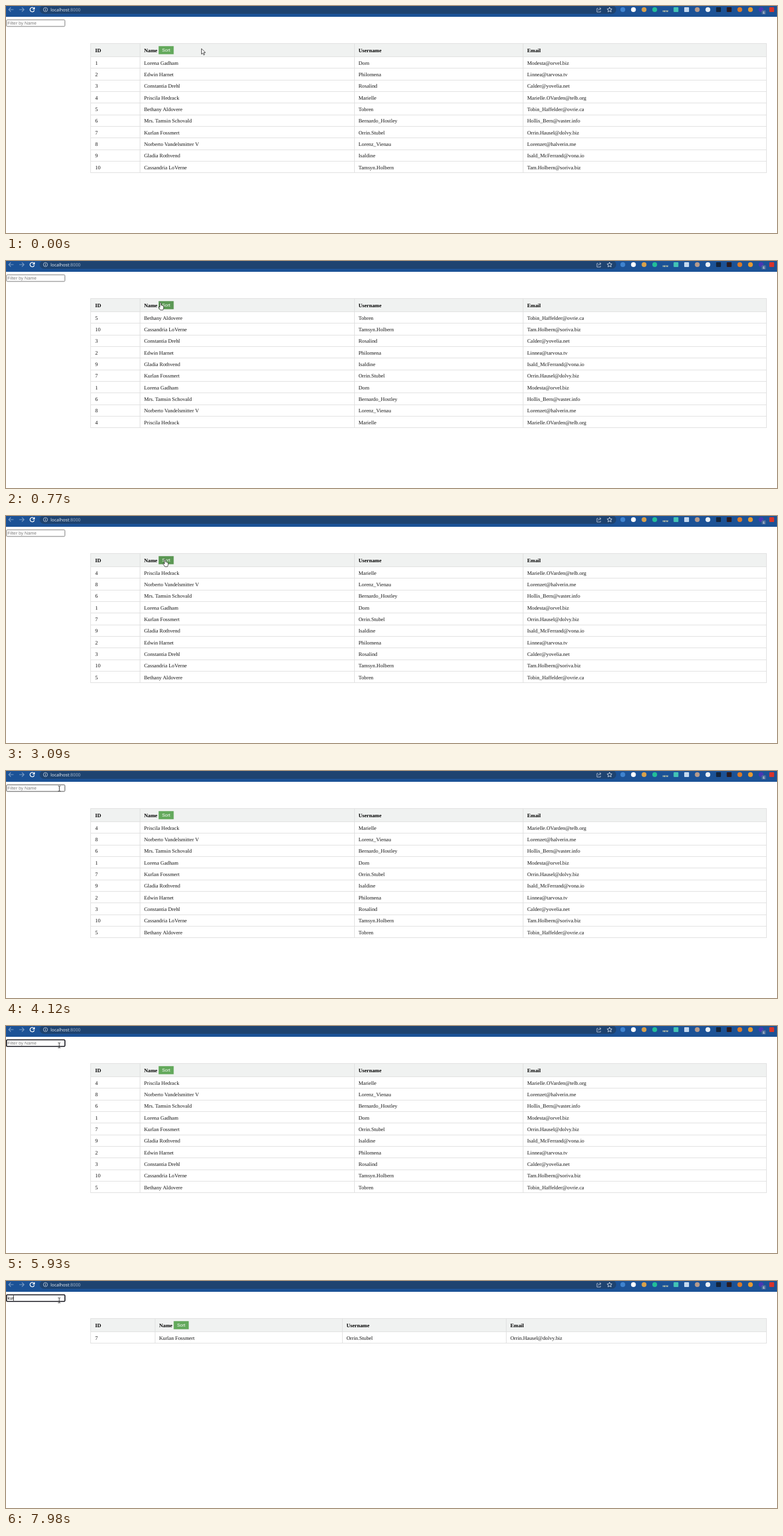
Animation of 1280 by 378 pixels, one loop 8 s. Source, as an HTML page:

```html
<!DOCTYPE html>
<html lang="en">
<head>
<meta charset="utf-8">
<title>Filter and sort table</title>
<style>
  html, body { margin: 0; width: 100%; height: 100%; overflow: hidden; background: #fff; }
  svg { display: block; width: 1280px; height: 378px; }
  text { font: 8.8px "Liberation Serif", serif; fill: #161616; text-rendering: geometricPrecision; white-space: pre; }
  .bold { font-weight: bold; fill: #000; }
  .ui { font: 7.4px "Liberation Sans", sans-serif; }
  .url { font: 7.4px "Open Sans", sans-serif; fill: #f2f5f9; }
  .line { fill: #e0e0e0; }
</style>
</head>
<body>
<svg viewBox="0 0 1280 378">
  <g id="bar">
    <rect width="1280" height="18" fill="#1c5296"/>
    <rect x="56" y="-1" width="957" height="14" rx="7" fill="#1e4370"/>
    <g fill="none" stroke-width="1.1">
      <path d="M12.5 6h-8M8 2.5L4.5 6L8 9.500" stroke="#7d9dc6"/>
      <path d="M22 6h8M26.500 2.500L30 6L26.500 9.500" stroke="#7d9dc6"/>
      <path d="M46.300 3.700A3.600 3.600 0 1 0 47 7M47.300 2v3h-3" stroke="#fff" stroke-width="1.300"/>
      <circle cx="65.500" cy="6" r="3.400" stroke="#d5deea" stroke-width=".8"/>
      <path d="M65.500 5.500v2.400M65.500 3.800v.9" stroke="#d5deea" stroke-width=".9"/>
      <path d="M983 4h-2v6h6v-2M983 7.500q.5-3 4-3M985.500 2.500l2.500 2l-2.500 2" stroke="#b9c6d8" stroke-width=".9"/>
      <path d="M1002 2l1.200 2.700l2.900.3l-2.200 1.900l.7 2.900l-2.600-1.500l-2.600 1.500l.7-2.900l-2.200-1.900l2.900-.3z" stroke="#dbe3ee" stroke-width=".9"/>
    </g>
    <text class="url" x="74" y="8.700">localhost<tspan fill="#a9b9cd">:8000</tspan></text>
  </g>
  <g id="field"></g>
  <g id="table"></g>
  <g id="pointer"></g>
</svg>
<script>
const LOOP = 8000;
const $ = id => document.getElementById(id);
const rect = (x, y, w, h, rest) => `<rect x="${x}" y="${y}" width="${w}" height="${h}" ${rest}/>`;
const dot = (x, y, r, fill, rest = '') => `<circle cx="${x}" cy="${y}" r="${r}" fill="${fill}" ${rest}/>`;
const text = (x, y, s, cls = '', rest = '') => `<text x="${x}" y="${y}" class="${cls}" ${rest}>${s}</text>`;

const people = [
  ['Lorena Gadham', 'Dorn', 'Modesta@orvel.biz'],
  ['Edwin Harnet', 'Philomena', 'Linnea@tarvosa.tv'],
  ['Constantia Drehl', 'Rosalind', 'Calder@yovelia.net'],
  ['Priscila Hedrack', 'Marielle', 'Marielle.OVarden@telb.org'],
  ['Bethany Aldovere', 'Tobren', 'Tobin_Haffelder@ovrie.ca'],
  ['Mrs. Tamsin Schovald', 'Bernardo_Hostley', 'Hollis_Bern@vaster.info'],
  ['Kurlan Fossmert', 'Orrin.Stubel', 'Orrin.Hausel@dolvy.biz'],
  ['Norberto Vandelsmitter V', 'Lorenz_Vienau', 'Lorenzet@halverin.me'],
  ['Gladia Rothvend', 'Isaldine', 'Isald_McFerrand@vona.io'],
  ['Cassandria LoVerne', 'Tamsyn.Holbern', 'Tam.Holbern@soriva.biz']
].map((p, i) => [i + 1, ...p]);
const ascending = [...people].sort((a, b) => a[1] < b[1] ? -1 : 1);
const orders = { none: people, up: ascending, down: [...ascending].reverse() };

// Left edges of the columns, by number of rows left
const columns = { 10: [140, 222, 578, 858], 2: [140, 238, 536, 786], 1: [140, 247, 558, 830] };

// Each track: [start ms, value...], held until the next step
const tracks = {
  order: [[0, 'none'], [770, 'up'], [2360, 'down']],
  query: [[0, ''], [6460, 'k'], [6790, 'ku'], [7050, 'kur'], [7250, 'kurt'], [7380, 'kurti'], [7780, 'kurt'], [7910, 'kur']],
  caret: [[0, 0], [4390, 1], [4850, 0], [5390, 1], [5930, 0], [6460, 1]],
  field: [[0, 'idle'], [3980, 'hover'], [4390, 'focus']],
  hover: [[0, 0], [330, 1], [3100, 0]],
  click: [[0, 0], [700, 1], [770, 0], [2230, 1], [2360, 0], [4320, 1], [4450, 0]],
  pointer: [
    [0, 'arrow', 324.5, 71], [70, 'arrow', 318, 70], [130, 'arrow', 304, 68], [200, 'arrow', 285, 65],
    [270, 'arrow', 266, 63], [330, 'hand', 254, 67], [430, 'hand', 255, 69], [560, 'hand', 256.5, 69.3],
    [1100, 'hand', 257, 69.5], [1200, 'hand', 258, 70], [1300, 'hand', 258.5, 70], [1370, 'hand', 259, 69.8],
    [3020, 'hand', 264, 72], [3100, 'arrow', 282, 74.5], [3170, 'arrow', 295, 75.5], [3250, 'arrow', 297, 74],
    [3320, 'arrow', 288, 69], [3400, 'arrow', 264, 61], [3470, 'arrow', 232, 53], [3550, 'arrow', 196, 46],
    [3620, 'arrow', 160, 40], [3700, 'arrow', 130, 36], [3780, 'arrow', 111.500, 34], [3840, 'arrow', 106, 33],
    [3910, 'arrow', 99, 31], [3980, 'beam', 93, 29.500], [4050, 'beam', 90, 29.300], [4120, 'beam', 88.500, 29.300],
    [5190, 'beam', 88.500, 30.500], [5260, 'beam', 88.300, 31.500], [5400, 'beam', 88.300, 32.200]
  ]
};
const at = (track, t) => track.findLast(step => step[0] <= t).slice(1);

const shapes = {
  arrow: '<path d="M0 0v9.200l2.200-2l1.500 3.400l1.600-.7l-1.500-3.300h2.900z" fill="#fff" stroke="#222" stroke-width=".8"/>',
  hand: '<path d="M-1 .8q1-1.500 2 0v3.700q1.200-.6 1.600.4q1.200-.4 1.500.6q1.100 0 1.100 1.200v2.500q-.4 1.400-1.200 3.200h-4.200q-1.400-2.400-3.300-4.800q.6-1.500 2.500.3z" fill="#fff" stroke="#222" stroke-width=".8"/>',
  beam: '<path d="M-2-4.200h1.300l.7.500l.7-.5h1.300M0-3.700v7.400M-2 4.200h1.300l.7-.5l.7.5h1.300" fill="none" stroke="#222" stroke-width=".9"/>'
};

function drawTable({ order, query }) {
  const rows = orders[order].filter(p => p[1].toLowerCase().includes(query));
  const xs = columns[rows.length] || columns[1];
  const lineY = i => Math.floor(84.6 + 19.3 * i);
  const bottom = lineY(rows.length);
  let out = rect(140, 62, 1123, 23, 'fill="#f0f2f1"');
  for (const x of [...xs, 1262]) out += rect(x, 62, 1, bottom - 61, 'class="line"');
  for (let i = -1; i <= rows.length; i++) out += rect(140, i < 0 ? 62 : lineY(i), 1123, 1, 'class="line"');
  ['ID', 'Name', 'Username', 'Email'].forEach((s, c) => out += text(xs[c] + (c ? 7.2 : 8), 76.6, s, 'bold'));
  rows.forEach((row, i) => row.forEach((s, c) =>
    out += text(xs[c] + (c ? 7.2 : 8), (97.8 + 19.3 * i).toFixed(1), s)));
  return { out, button: xs[1] + 31.4 };
}

function drawField({ field, query, caret }) {
  const focus = field === 'focus';
  const border = { idle: '#777', hover: '#4c4c4c', focus: '#101018' }[field];
  return rect(.8, 23, 97, 11, `rx="1.500" fill="#fff" stroke="${border}" stroke-width="${focus ? 1.6 : 1}"`) +
    text(2.5, 31.100, query || 'Filter by Name', 'ui', query ? '' : 'style="fill:#7c7c7c"') +
    (caret ? rect([3, 6, 10, 12, 14, 16][query.length], 24, .8, 9, 'fill="#111"') : '');
}

function drawPointer(pointer, click) {
  const [shape, x, y] = pointer;
  const glow = click ? dot(x - 1, y + (shape === 'hand' ? 2.5 : 0), 6.2, '#f7ea10', 'opacity=".8"') : '';
  return `${glow}<g transform="translate(${x} ${y})">${shapes[shape]}</g>`;
}

function drawBar() {
  const icons = ['#3f83cf', '#fff', '#d7a04c', '#22bd98', '', '#43c3b5', '#c4d9ef', '#b79b8c', '#e9f0f7',
    '#13243c', '#2b1b20', '#d97a2b', '#e59a33', '#4937b3', '#d9342b'];
  const square = [5, 6, 9, 10, 14];
  return icons.map((fill, i) => {
    const x = 1024 + 17.66 * i;
    if (!fill) return text(x - 4.500, 9.500, 'NEW', 'ui', 'style="font-size:4px;font-weight:bold;fill:#f1eaae"');
    return square.includes(i) ? rect(x - 4, 2, 8, 8, `rx="1" fill="${fill}"`) : dot(x, 6, 4, fill);
  }).join('') + rect(1254.500, 7, 7, 7, 'rx="1.500" fill="#4d6d9b"') +
    text(1256.500, 12.500, '6', 'ui', 'style="font-size:5.500px;fill:#fff"');
}

let shown = '';
function render(t) {
  const state = {};
  for (const name in tracks) state[name] = name === 'pointer' ? at(tracks[name], t) : at(tracks[name], t)[0];
  const key = JSON.stringify(state);
  if (key === shown) return;
  shown = key;
  const { out, button } = drawTable(state);
  $('table').innerHTML = out +
    rect(button, 66.800, 25, 13.500, `fill="${state.hover ? '#5b9854' : '#63a95c'}"`) +
    text(button + 5.700, 76.200, 'Sort', 'ui', 'style="fill:#fff"');
  $('field').innerHTML = drawField(state);
  $('pointer').innerHTML = drawPointer(state.pointer, state.click);
}

$('bar').insertAdjacentHTML('beforeend', drawBar());
const start = performance.now();
function tick() {
  render((performance.now() - start) % LOOP);
  requestAnimationFrame(tick);
}
tick();
</script>
</body>
</html>
```
